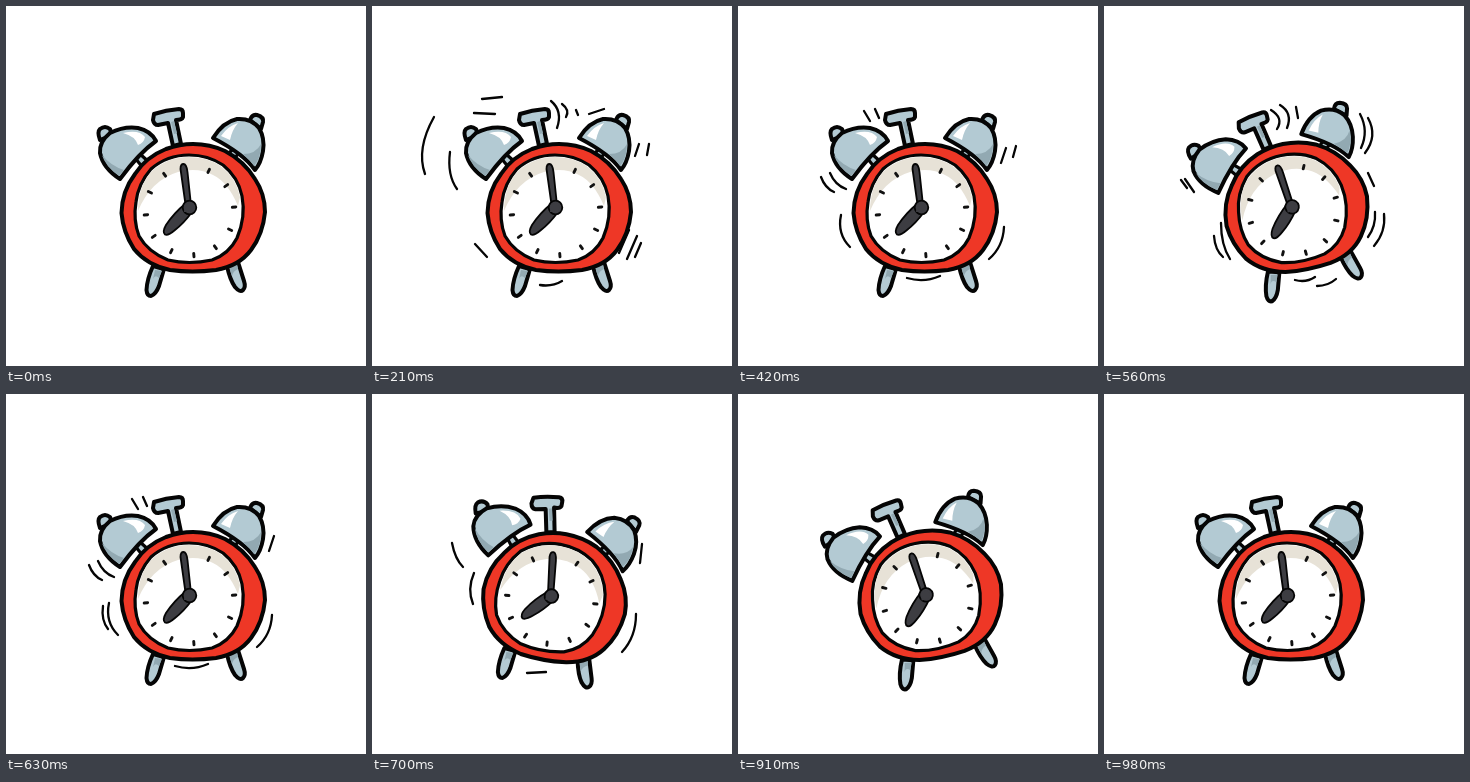
Recreate the animation shown at these times as an HTML page. Size 360x360 px, loop 1050 ms.

```html
<!DOCTYPE html>
<html lang="en">
<head>
<meta charset="utf-8">
<title>Alarm clock</title>
<style>
  html, body { margin: 0; width: 100%; height: 100%; overflow: hidden; background: #fff; }
  svg { display: block; width: 100%; height: 100%; }
  .ink { stroke: #050505; stroke-width: 4; stroke-linejoin: round; stroke-linecap: round; }
  .thin { stroke-width: 3.2; }
  .steel { fill: #b3cad3; }
  .shade { fill: #92a9b2; }
  .shine { fill: #fff; }
  .hand { fill: #3d3d42; stroke-width: 1.8; }
  #lines { fill: none; stroke-width: 2.3; }
</style>
</head>
<body>
<svg viewBox="0 0 360 360">
  <g id="clock">
    <g id="leftLeg">
      <path class="ink steel" d="M147 260Q141 273 140.500 284Q141 290 145 290Q150 288 153 280L158 263Z"/>
      <path class="shade" d="M149 264L156 265L153 272Q149 268 147 273Z"/>
    </g>
    <path class="ink steel" d="M221 260Q224 274 229 281Q234 287 237 284Q240 281 238 275L232 256Z"/>
    <path class="shade" d="M223 261L231 258L232 263Q227 265 226 270Z"/>

    <path class="ink steel" d="M148 108Q160 104 173 103Q177 103 177 107L177 111Q176 114 170 114L175 138L167 140L162 117L152 119Q148 119 147 114Z"/>
    <path class="shade" d="M165 116L168 115L171 127L168 128Z"/>

    <path class="ink thin steel" d="M129 152L134 148L144 157L138 163Z"/>
    <path class="ink thin steel" d="M227 143L233 147L226 155L219 151Z"/>

    <path class="ink steel" d="M94 134Q91 126 94 123Q99 119 104 123L106 129Z"/>
    <path class="ink steel" d="M114 173Q97 162 94 147Q93 136 104 127Q118 120 132 122Q145 125 150 135Q133 147 114 173Z"/>
    <path class="shade" d="M113 170Q99 160 96 149Q105 160 118 164Z"/>
    <path class="shine" d="M117 127Q133 123 139 131Q138 137 132 139Q129 130 117 127Z"/>

    <path class="ink steel" d="M244 114Q246 108 251 109Q258 111 257 116L255 123Z"/>
    <path class="ink steel" d="M207 132Q217 116 231 113Q245 112 253 122Q259 132 257 145Q255 157 249 164Q238 148 207 132Z"/>
    <path class="shade" d="M248 160Q243 153 237 148Q250 148 255 138Q255 152 248 160Z"/>
    <path class="shine" d="M215 130Q222 120 232 117Q226 124 224 134Z"/>

    <path class="ink" fill="#ee3726" d="M187 138Q204 138 219 145Q238 155 249 173Q259 188 259 206Q257 228 245 244Q233 260 210 264Q186 267 164 264Q141 259 128 243Q117 226 115.500 207Q116 185 129 168Q140 151 160 143Q174 138 187 138Z"/>
    <path class="ink thin" fill="#fff" d="M183 149Q202 149 217 159Q232 171 236 190Q240 211 231 232Q223 248 206 254Q183 259 162 254Q142 246 133 230Q127 214 130 196Q132 178 145 163Q161 149 183 149Z"/>
    <path fill="#e7e2d7" d="M132 205Q132 180 146 165Q162 151 183 151Q202 151 216 161Q230 172 234 191L232 200Q222 176 207 169Q192 161 172 166Q145 174 132 205Z"/>
    <g id="ticks" stroke="#111" stroke-width="2.9" stroke-linecap="round"></g>

    <path class="ink hand" d="M180 202Q177 181 174.500 163Q174.500 158 177.500 158Q180.500 158 181.500 166L185 199Z"/>
    <path class="ink hand" d="M179 198Q168 207 160 219Q156 226 159 228.500Q162 230 169 224Q178 217 186 206Z"/>
    <circle class="ink hand" cx="183.500" cy="201.500" r="6.800"/>
    <path class="hand" d="M179 199L185 196L188 202L184 206L178 206Z"/>
  </g>
  <path id="lines" class="ink"/>
</svg>
<script>
const LOOP = 1050;
const HUB = [183, 201];
const $ = id => document.getElementById(id);

// Dial marks; twelve o'clock stays hidden behind the hand.
for (let k = 1; k < 12; k++) {
  const a = (30 * k - 5) * Math.PI / 180;
  const mark = document.createElementNS("http://www.w3.org/2000/svg", "line");
  const at = r => [184 + r * Math.sin(a), 205 - r * Math.cos(a)];
  [mark.x1.baseVal.value, mark.y1.baseVal.value] = at(42.5);
  [mark.x2.baseVal.value, mark.y2.baseVal.value] = at(46);
  $("ticks").append(mark);
}

// The left leg keeps its direction when the clock leans on it.
const POSES = {
  mid: { turn: 0, dx: 0, dy: 0, leg: 0 },
  left: { turn: 10.5, dx: -4, dy: 0.5, leg: -10.5 },
  right: { turn: -11.5, dx: 4.5, dy: -0.5, leg: 0 }
};

const LINES = {
  none: "",
  burst: "M62 111Q44 143 53 168M78 146Q75 169 85 183M110 93L130 91M102 107L123 108" +
    "M179 95Q191 105 185 122M190 98Q198 104 194 111M204 104L206 109M217 108L232 103" +
    "M267 138L263 150M277 138L275 149M257 224L247 247M265 230L255 253M269 237L263 251" +
    "M103 238L115 251M168 279Q180 281 190 275",
  fading: "M80 146Q76 167 86 183M105 107L123 108M184 98Q192 108 187 121M195 101L196 110" +
    "M217 108L232 103M268 138L264 150M278 138L275 149M265 228L255 251M104 238L115 250" +
    "M168 279Q180 281 190 275",
  tiltLeft: "M96 98Q86 110 86 123M145 98Q145 103 150 106M152 90Q151 97 156 102" +
    "M78 144Q80 163 91 173M93 148Q95 159 102 162M102 179Q95 195 101 210" +
    "M220 116L238 114M270 150L268 169M264 187L265 197M264 220Q264 243 250 258" +
    "M273 232L270 244M113 262L109 271M155 279Q164 281 174 278M229 273L232 286",
  rest: "M126 105L132 115M137 103L141 112M92 167Q97 179 108 183M83 171Q87 182 96 186" +
    "M103 209Q99 228 112 241M268 142L263 157M278 140L275 151M266 221Q265 241 251 253" +
    "M169 272Q186 277 202 270",
  tiltRight: "M167 104Q180 112 173 123M176 99Q189 107 183 122M192 101L194 112" +
    "M256 108Q265 125 257 142M264 112Q274 130 261 147M77 174L83 182M81 173L90 186" +
    "M264 167L270 180M271 206Q272 220 264 231M280 208Q282 226 270 240" +
    "M117 217Q117 239 126 253M110 230Q111 244 119 251M191 274Q202 277 211 271" +
    "M213 280Q224 280 232 273",
  settle: "M126 105L132 115M137 103L141 112M92 167Q97 179 108 183M83 171Q87 182 96 186" +
    "M103 209Q99 228 112 241M97 212Q95 226 102 235M268 142L263 157" +
    "M266 221Q265 241 251 253M169 272Q186 277 202 270",
  last: "M80 149Q83 165 91 173M102 179Q95 195 101 210M270 150L268 169" +
    "M264 220Q264 243 250 258M155 279L174 278"
};

// Start time in ms, pose, speed lines.
const STEPS = [
  [0, "mid", "none"],
  [210, "mid", "burst"],
  [280, "mid", "fading"],
  [350, "left", "tiltLeft"],
  [420, "mid", "rest"],
  [560, "right", "tiltRight"],
  [630, "mid", "settle"],
  [700, "left", "last"],
  [770, "mid", "none"],
  [910, "right", "none"],
  [980, "mid", "none"]
];

function draw(t) {
  const [, name, lines] = STEPS.filter(s => s[0] <= t).pop();
  const { turn, dx, dy, leg } = POSES[name];
  $("clock").setAttribute("transform", `translate(${dx} ${dy}) rotate(${turn} ${HUB})`);
  $("leftLeg").setAttribute("transform", `rotate(${leg} 153 262)`);
  $("lines").setAttribute("d", LINES[lines]);
}

const start = performance.now();
function tick() {
  draw((performance.now() - start) % LOOP);
  requestAnimationFrame(tick);
}
tick();
</script>
</body>
</html>
```
